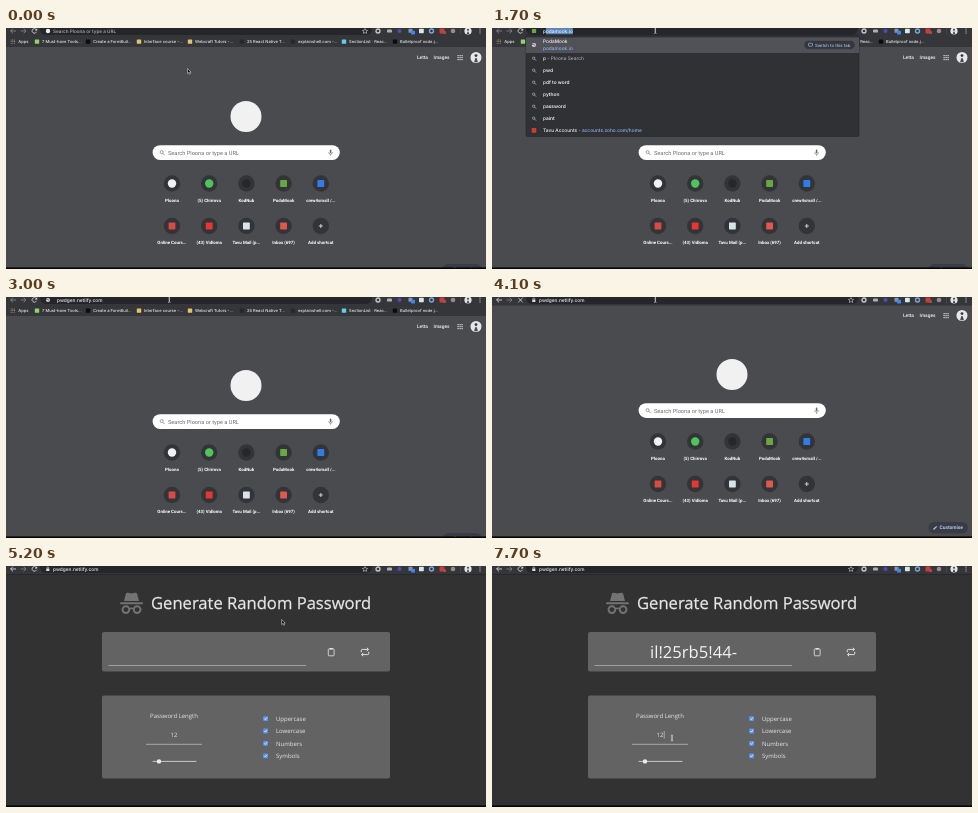
Recreate the animation shown at these times as an HTML page. Size 480x241 px, loop 8000 ms.

```html
<!DOCTYPE html>
<html lang="en">
<head>
<meta charset="utf-8">
<title>Password generator demo</title>
<style>
html, body { margin: 0; width: 100%; height: 100%; overflow: hidden; background: #000; }
svg { display: block; width: 100%; height: 100%; text-rendering: geometricPrecision; }
text { white-space: pre; }
.ui { font-family: Inter, Roboto, sans-serif; font-weight: 500; }
.ntp { font-family: Roboto, Arial, sans-serif; font-weight: 500; }
.web { font-family: "Open Sans", sans-serif; }
.plain { font-family: "Liberation Serif", "Times New Roman", serif; }
</style>
</head>
<body>
<svg id="stage" viewBox="0 0 480 241" preserveAspectRatio="none"></svg>
<script>
const LOOP = 8000, STEP = 100;
const stage = document.getElementById('stage');

// Shape helpers returning SVG markup
const rect = (x, y, w, h, fill, r = 0, more = '') =>
  `<rect x="${x}" y="${y}" width="${w}" height="${h}" rx="${r}" fill="${fill}" ${more}/>`;
const dot = (x, y, r, fill, more = '') => `<circle cx="${x}" cy="${y}" r="${r}" fill="${fill}" ${more}/>`;
const line = (d, color, w = 0.8, more = '') =>
  `<path d="${d}" fill="none" stroke="${color}" stroke-width="${w}" ${more}/>`;
const label = (x, y, size, fill, str, more = '') =>
  `<text x="${x}" y="${y}" font-size="${size}" fill="${fill}" ${more}>${str}</text>`;
const group = (id, body, more = '') => `<g id="${id}" ${more}>${body}</g>`;
const mid = 'text-anchor="middle"';
const lens = (x, y, s, color) =>
  line(`M${x + s * .4} ${y + s * .4}l${s} ${s}`, color, s * .45) +
  dot(x - s * .2, y - s * .2, s * .8, 'none', `stroke="${color}" stroke-width="${s * .4}"`);
const square = (x, y, s, fill) => rect(x - s / 2, y - s / 2, s, s, fill, .6);
const globe = (x, y) => dot(x, y, 2.1, '#d5d7da') + line(`M${x - 2} ${y - .6}h2.2l1 1.6`, '#55575c', .7);
const person = (x, y, r) => dot(x, y, r, '#e6e7ea') + dot(x, y - r * .35, r * .26, '#33343a') +
  `<path d="M${x - r * .34} ${y + r * .85}q${r * .34} ${-r * 1.6} ${r * .68} 0z" fill="#4a4b52"/>`;

function bookmarks() {
  const items = [
    [36, '7 Must-have Tools…', '#8fd46a'], [87, 'Create a FormBuil…', '#0c0c0d'],
    [138, 'Interface course -…', '#e8c06a'], [189, 'Webcraft Tutors -…', '#e8c06a'],
    [241, '25 React Native T…', '#26282c'], [292, 'explainshell.com -…', '#26282c'],
    [343, 'SectionList · Reac…', '#62cfe8'], [394, 'Bulletproof node.j…', '#0c0c0d']
  ];
  let s = rect(0, 8, 480, 11, '#35363a');
  const colors = ['#e5534b', '#f0b63e', '#58a55c', '#4f8df5'];
  for (let i = 0; i < 9; i++)
    s += square(5.2 + i % 3 * 1.6, 12 + Math.floor(i / 3) * 1.6, 1.1, colors[i % 4]);
  s += label(12.3, 15.2, 4.1, '#e6e8eb', 'Apps');
  for (const [x, name, color] of items)
    s += square(x - 5, 13.6, 4.4, color) + label(x, 15.2, 4.1, '#e6e8eb', name);
  return `<g class="ui">${s}</g>`;
}

function newTab() {
  const tiles = [
    ['Ploona', '#f1f1f1', 1], ['(5) Chirrova', '#4fc35c', 1], ['KodNub', '#25272a', 1],
    ['PodaMook', '#68a843'], ['crew4small /...', '#2f7de9'],
    ['Online Cours...', '#d94a43'], ['(43) Vidloma', '#e6362f'],
    ['Tavu Mail (p...', '#d9e4ea'], ['Inbox (697)', '#e2574c'], ['Add shortcut']
  ];
  let s = rect(0, 19, 480, 240, '#4a4b4f');
  s += label(411, 31, 4.8, '#f4f4f4', 'Letta') + label(427.6, 31, 4.8, '#f4f4f4', 'Images');
  for (let i = 0; i < 9; i++)
    s += rect(451.5 + i % 3 * 2, 27 + Math.floor(i / 3) * 2, 1.2, 1.2, '#d8d8d8');
  s += person(470, 29.5, 5.5) + dot(240, 88.5, 15.5, '#f1f1f1');
  s += rect(146.6, 117.2, 187.2, 14.8, '#fff', 7.4) + lens(156, 124.5, 1.9, '#7f8388') +
    label(162, 126.7, 5.65, '#6c6f74', 'Search Ploona or type a URL', 'font-weight="400"');
  s += rect(323.8, 121.6, 1.6, 3.6, '#666a70', .8) +
    line('M322.7 124.2q0 2 1.9 2q1.9 0 1.9-2M324.6 126.2v1.6', '#666a70', .6);
  tiles.forEach(([name, color, round], i) => {
    const x = 166 + i % 5 * 37.2, y = i < 5 ? 155.5 : 198;
    s += dot(x, y, 8.2, '#333438');
    if (!color) s += line(`M${x - 2} ${y}h4M${x} ${y - 2}v4`, '#eee', .8);
    else s += round ? dot(x, y, 4.2, color) : square(x, y, 6.8, color);
    s += label(x, y + 18.4, 4.4, '#fff', name, mid + ' font-weight="600"');
  });
  s += rect(436.5, 236, 39.5, 11.5, '#3a3c45', 5.7) +
    line('M441.5 243.5l3.2-3.2', '#b4c5f5', 1.2) +
    label(447.5, 243.4, 4.9, '#b4c5f5', 'Customise', 'font-weight="600"');
  return `<g class="ntp">${s}</g>`;
}

function toolbar() {
  let s = rect(0, 0, 480, 8.6, '#35363a') + rect(34, -6, 332, 13, '#25262a', 6);
  s += group('back', line('M10 3H4.6M7 .6L4.6 3L7 5.4', '#e2e4e7')) +
    line('M14.6 3H20M17.6 .6L20 3L17.6 5.4', '#85878b');
  s += group('reload', line('M30.3 1.6A2.3 2.3 0 1 0 30.5 3.8', '#d9dbde') +
    '<path d="M31.2 .2v2.4h-2.4z" fill="#d9dbde"/>');
  s += group('stop', line('M26.4 1l4.2 4.2M30.6 1l-4.2 4.2', '#d9dbde'));
  s += group('star', line('M359 .6l.8 1.6 1.8.2-1.3 1.2.4 1.8-1.7-.9-1.7.9.4-1.8-1.3-1.2 1.8-.2z', '#cfd1d4', .6));
  s += dot(372, 3, 2, 'none', 'stroke="#c9cbce" stroke-width="1.3"');
  s += rect(381, 1.4, 5, 3.2, '#aeb0b4', 1.2) + dot(393.5, 3, 2, '#4b4fb5');
  s += rect(402.5, .8, 4, 4, '#8196b5', .6) + rect(405, 2.8, 4, 3.6, '#3f86ef', .6);
  s += rect(413, .8, 4.8, 4.4, '#d5e8ea', .6) + dot(425.5, 3, 2, 'none', 'stroke="#7ea5dc" stroke-width="1.4"');
  s += rect(433.5, .6, 5, 5, '#cf3a3a', .8) + rect(437, 3, 3, 3, '#a9494c', .6) + dot(447, 3, 2.3, '#9a8a86');
  s += line('M454.5 0v6.5', '#55575b', .5) + person(462, 3, 3.6);
  for (const y of [1, 3, 5]) s += dot(474, y, .6, '#d9dbde');
  s += group('siteDot', dot(42, 3, 2.2, '#eceef0')) + group('siteSquare', square(42, 3, 4.2, '#68a843')) +
    group('siteGlobe', globe(42, 3));
  s += group('lock', rect(40.2, 2.4, 3.2, 2.7, '#d9dbde', .4) + line('M40.9 2.6v-.8a.9.9 0 0 1 1.8 0v.8', '#d9dbde', .6));
  s += rect(0, 0, 0, 6.4, '#5a86bd', 0, 'id="mark"') + label(47, 4.8, 4.8, '#e8eaed', '', 'id="url"') +
    line('M0 .6v5', '#e8eaed', .5, 'id="caret"');
  return `<g class="ui">${s}</g>`;
}

function suggestions(id, title, url, rows, last) {
  let s = rect(34, 7, 333, 101.5, '#303135', 1.5, 'stroke="#26272a" stroke-width=".6"') +
    rect(34, 9.4, 333, 15.6, '#505257');
  s += globe(42, 17) + label(51, 15.3, 4.8, '#f0f1f2', title) + label(51, 21.9, 4.8, '#8fb4f3', url);
  s += rect(312, 12.4, 51, 9, '#35363a', 4.5, 'stroke="#5c5e63" stroke-width=".4"') +
    rect(316.5, 15.2, 4, 3, 'none', .5, 'stroke="#8fb4f3" stroke-width=".7"') +
    label(323, 18.5, 4.3, '#a8c4f7', 'Switch to this tab');
  rows.forEach(([typed, rest], i) => {
    const y = 30.5 + i * 12;
    const tail = i ? `<tspan font-weight="600">${rest}</tspan>` : `<tspan fill="#a5a8ad">${rest}</tspan>`;
    s += lens(42, y, 1.5, '#c5c7ca') + label(51, y + 1.8, 4.8, '#f0f1f2', typed + tail);
  });
  s += square(42, 102.4, 4.6, '#d8382f') + label(51, 104.2, 4.8, '#f0f1f2',
    `Tavu Accounts <tspan fill="#a5a8ad">-</tspan> <tspan fill="#8fb4f3">${last}</tspan>`);
  return group(id, s, 'class="ui"');
}

function generator() {
  const ink = '#e6e6e6', grey = '#737373';
  let s = rect(0, 8.6, 480, 232, '#323232');
  s += group('spy',
    `<path d="M-7.5 -2l1.8-7q.6-1.6 2.3-1.2l3.4.8 3.4-.8q1.7-.4 2.3 1.2l1.8 7z" fill="${grey}"/>` +
    rect(-11.5, -.8, 23, 2, grey, 1) +
    [-5.6, 5.6].map(x => dot(x, 6.6, 3.4, 'none', `stroke="${grey}" stroke-width="1.9"`)).join('') +
    line('M-2.4 6q2.4-1.4 4.8 0', grey, 1.4));
  s += label(145, 43, 16.6, ink, 'Generate Random Password', 'id="heading"');
  s += rect(96, 66, 288, 39.6, '#636363', 2) + rect(96, 129.6, 288, 82.8, '#636363', 2);
  s += line('M102.5 99.5H300', '#b9b9b9', .7) + label(201.5, 92, 16.6, '#f2f2f2', '', `id="pass" ${mid}`);
  s += group('copy', rect(322.3, 82.8, 5.8, 7, 'none', .8, 'stroke="#e8e8e8" stroke-width=".8"') +
    rect(323.7, 81.9, 3, 1.7, '#e8e8e8', .4));
  s += group('redo', line('M-3.8 .2v-1.6q0-1.2 1.2-1.2H3.2M3.8-.2v1.6q0 1.2-1.2 1.2H-3.2M1.8-4.2L3.5-2.6L1.8-1M-1.8 1L-3.5 2.6L-1.8 4.2', '#f0f0f0', .9));
  s += label(168, 152.3, 6, ink, 'Password Length', mid) + label(168, 171, 6, ink, '12', mid) +
    line('M140 178.3H196', '#c4c4c4', .7) + line('M172.2 165v7.6', '#f2f2f2', .5, 'id="bar"');
  s += line('M147 195.4H190', '#c9c9c9', 1, 'stroke-linecap="round"') + dot(153, 195.4, 2.2, '#ececec');
  ['Uppercase', 'Lowercase', 'Numbers', 'Symbols'].forEach((name, i) => {
    const y = 152.6 + i * 12.4;
    s += rect(257.2, y - 2.4, 4.8, 4.8, '#5b97f5', .8) + line(`M258.3 ${y}l1 1.1 1.7-2.2`, '#fff', .7) +
      label(270, y + 2.3, 6, ink, name);
  });
  return group('app', s);
}

const pointers =
  group('arrow', '<path d="M0 0v5l1.2-1 .8 1.8.9-.4-.8-1.7h1.5z" fill="#111" stroke="#eee" stroke-width=".5"/>') +
  group('beam', line('M-1.2-3q1.2 0 1.2 1v4q0 1-1.2 1M1.2-3q-1.2 0-1.2 1v4q0 1 1.2 1', '#e4e4e4', .6)) +
  group('hand', '<path d="M-.6-2q.6-.7 1.2 0v1.8l1.8.5q.5.2.4 1l-.5 2H-.8L-2.2 1q.3-.8 1.6-.1z" fill="#fff" stroke="#333" stroke-width=".3"/>');

stage.innerHTML = group('tab', newTab() + bookmarks()) + generator() + toolbar() +
  suggestions('listP', 'PodaMook', 'podamook.io',
    [['p', ' - Ploona Search'], ['p', 'wd'], ['p', 'df to word'], ['p', 'ython'], ['p', 'assword'], ['p', 'aint']],
    'accounts.zoho.com/home') +
  suggestions('listPwd', 'Document', 'pwdgen.netlify.com',
    [['pwd', ' - Ploona Search'], ['pwd', ' command'], ['pwd', ' command in linux'], ['pwd', ' means'],
      ['pwd', ' in windows'], ['pwd', 'ms']],
    'accounts.zoho.com/home#security/security_<tspan font-weight="600">pwd</tspan>') +
  pointers + rect(0, 239.4, 480, 2, '#050505');

const el = {};
stage.querySelectorAll('[id]').forEach(n => el[n.id] = n);
const show = (id, on) => el[id].setAttribute('display', on ? 'inline' : 'none');
const put = (id, x, y, k = 1) => el[id].setAttribute('transform', `translate(${x} ${y}) scale(${k})`);
const latest = (t, keys) => keys.filter(k => t >= k[0]).pop();

// [start, end, x, y]: the pointer travels to x, y between start and end
const moves = [[0, 0, 181.5, 40.5], [0, 800, 163.3, 1], [4700, 5600, 356, 91], [7100, 7600, 180, 172]];
function pointerAt(t) {
  let [, , x, y] = moves[0];
  for (const [a, b, tx, ty] of moves.slice(1)) {
    const u = Math.min(1, Math.max(0, (t - a) / (b - a))), e = u * u * (3 - 2 * u);
    x += (tx - x) * e;
    y += (ty - y) * e;
  }
  return [x, y];
}

const passwords = [[0, ''], [5800, 'bRj""Gu.Tr$g'], [6500, 'Lx4e!nP6sd?R'], [6800, 'a7Tq;w2)Kf.u'], [7100, 'il!25rb5!44-']];
// [time, text, typed letters]
const typing = [[0, 'Search Ploona or type a URL', 0], [1600, 'podamook.io', 1],
  [1900, 'pwdgen.netlify.com', 2], [2200, 'pwdgen.netlify.com', 3], [2800, 'pwdgen.netlify.com', 18]];

function draw(t) {
  const entry = t >= 1600 && t < 3300, site = t >= 4200, styled = t >= 4300;

  const [, text, typed] = latest(t, typing);
  const ux = entry ? 51 : 47, size = t < 1600 ? 4.65 : 4.8;
  el.url.textContent = text;
  el.url.setAttribute('x', ux);
  el.url.setAttribute('font-size', size);
  el.url.setAttribute('fill', t < 1600 ? '#b2b5ba' : '#f0f1f3');
  const marked = entry && typed < text.length;
  show('mark', marked);
  if (marked) {
    const from = el.url.getSubStringLength(0, typed);
    el.mark.setAttribute('x', ux + from);
    el.mark.setAttribute('width', el.url.getComputedTextLength() - from);
  }
  show('caret', t >= 1000 && t < 1500);
  put('caret', 46.7, 0);

  show('siteDot', t < 1600);
  show('siteSquare', t >= 1600 && t < 1900);
  show('siteGlobe', t >= 1900 && t < 3300);
  show('lock', t >= 3300);
  show('star', !entry);
  const loading = t >= 3300 && !styled;
  show('stop', loading);
  show('reload', !loading);
  el.back.setAttribute('opacity', t < 3300 ? .5 : 1);
  show('listP', t >= 1700 && t < 1900);
  show('listPwd', t >= 1900 && t < 2800);

  put('tab', 0, t < 3300 ? 0 : t < 3400 ? -6 : -11);
  show('tab', !site);
  show('app', site);
  el.app.setAttribute('class', styled ? 'web' : 'plain');
  el.heading.setAttribute('x', styled ? 145 : 154);
  el.heading.setAttribute('font-weight', styled ? 400 : 700);
  el.heading.setAttribute('stroke', styled ? '#e6e6e6' : 'none');
  el.heading.setAttribute('stroke-width', .25);
  put('spy', styled ? 125.5 : 134.5, 37);
  show('copy', t >= 4500);
  show('redo', t >= 4500);
  const hover = t >= 5500 && t < 7200;
  put('redo', 359, 86, hover ? 1.25 : 1);
  el.pass.textContent = latest(t, passwords)[1];
  show('bar', t >= 7600);

  const [x, y] = pointerAt(t);
  const beam = t >= 1700 && t < 4800 || t >= 7600;
  show('beam', beam);
  show('hand', hover);
  show('arrow', !beam && !hover);
  put('beam', x, y + (t < 4800 ? 1.5 : 0));
  put('hand', x, y);
  put('arrow', x, y);
}

function tick(now) {
  draw(Math.floor(now % LOOP / STEP) * STEP);
  requestAnimationFrame(tick);
}
draw(0);
requestAnimationFrame(tick);
</script>
</body>
</html>
```
